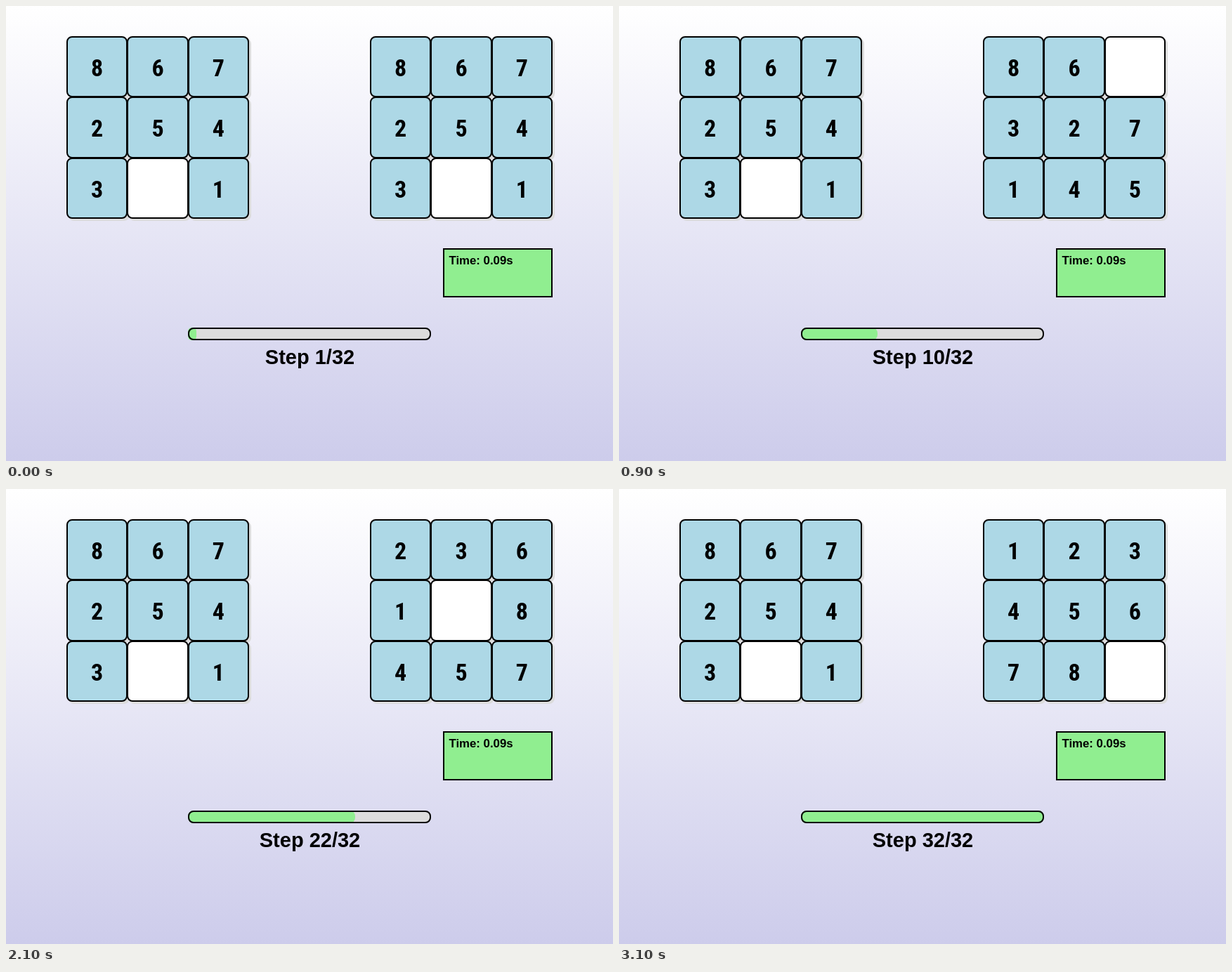
An HTML page with a canvas that plays this animation: 864x648 px, repeating every 3.2 s.

```html
<!DOCTYPE html>
<html lang="en">
<head>
<meta charset="utf-8">
<title>Sliding puzzle</title>
<style>
  html, body { margin: 0; width: 100%; height: 100%; overflow: hidden; }
  canvas { display: block; }
</style>
</head>
<body>
<canvas width="864" height="648"></canvas>
<script>
const ctx = document.querySelector('canvas').getContext('2d');
const CELL = 86.4, STEP_MS = 100;
const START = '8672543_1';
const MOVES = 'RULLDR' + 'RUU' + 'LDLURDL' + 'DRRUL' + 'DRUULL' + 'DDRR';
const SHIFT = { U: -3, D: 3, L: -1, R: 1 };
const SANS = '"Liberation Sans", Arial, sans-serif';
const NARROW = '"Liberation Sans Narrow", "Roboto Condensed", Roboto, sans-serif';

// Every board from the start to the solved state; letters move the gap.
const boards = [START];
for (const move of MOVES) {
  const tiles = [...boards.at(-1)];
  const gap = tiles.indexOf('_'), next = gap + SHIFT[move];
  [tiles[gap], tiles[next]] = [tiles[next], '_'];
  boards.push(tiles.join(''));
}

const sky = ctx.createLinearGradient(0, 0, 0, 648);
sky.addColorStop(0, '#ffffff');
sky.addColorStop(1, '#cdcceb');

// Covers whole pixels, from the one holding (x, y) to the one holding (x + w, y + h).
function box(x, y, w, h, radius, fill, outlined) {
  const left = Math.floor(x), top = Math.floor(y);
  const width = Math.floor(x + w) + 1 - left, height = Math.floor(y + h) + 1 - top;
  const inset = outlined ? 1 : 0;
  ctx.beginPath();
  ctx.roundRect(left + inset, top + inset, width - 2 * inset, height - 2 * inset,
    Math.max(0, radius - inset));
  if (fill) {
    ctx.fillStyle = fill;
    ctx.fill();
  }
  if (outlined) {
    ctx.lineWidth = 2;
    ctx.strokeStyle = '#000';
    ctx.stroke();
  }
}

function label(text, x, y, font, align) {
  ctx.font = `bold ${font}`;
  ctx.textAlign = align;
  ctx.fillStyle = '#000';
  ctx.fillText(text, x, y);
}

function drawBoard(board, left) {
  [...board].forEach((tile, i) => {
    const x = left + i % 3 * CELL;
    const y = CELL / 2 + Math.floor(i / 3) * CELL;
    box(x + 3, y + 3, CELL, CELL, 8, '#dcdcdc');
    box(x, y, CELL, CELL, 8, tile === '_' ? '#fff' : '#add8e6', true);
    if (tile !== '_') {
      label(tile, x + CELL / 2, Math.floor(y) + 57, `condensed 34px ${NARROW}`, 'center');
    }
  });
}

function draw(now) {
  const index = Math.floor(now / STEP_MS) % boards.length;
  const step = index + 1, total = boards.length;
  ctx.fillStyle = sky;
  ctx.fillRect(0, 0, 864, 648);

  drawBoard(START, CELL);
  drawBoard(boards[index], CELL * 6);

  box(CELL * 7.2, CELL * 4, CELL * 1.8, CELL * 0.8, 0, '#90ee90', true);
  label('Time: 0.09s', 630.5, 368, `16.8px ${SANS}`, 'left');

  const barX = CELL * 3, barWidth = CELL * 4;
  const done = barWidth * step / total;
  box(barX, 458, barWidth, 17, 8, '#dcdcdc');
  box(barX, 458, done, 17, Math.min(8, done / 2), '#90ee90');
  box(barX, 458, barWidth, 17, 8, null, true);
  label(`Step ${step}/${total}`, 432.5, 510, `29px ${SANS}`, 'center');
}

function loop() {
  draw(performance.now());
  requestAnimationFrame(loop);
}
loop();
</script>
</body>
</html>
```
